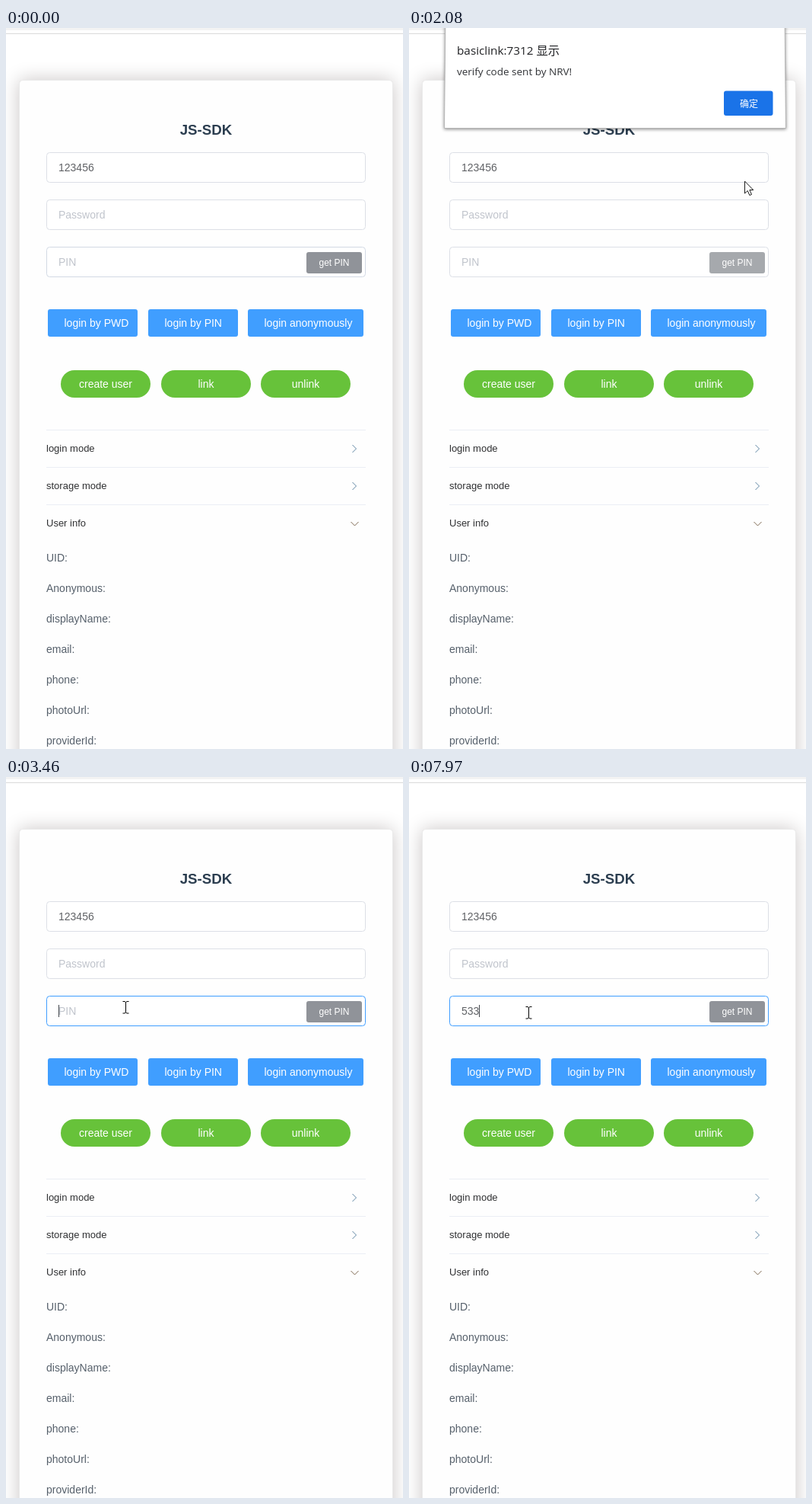
An HTML page that plays this animation: 522 by 946 pixels, repeating every 8000 ms.

```html
<!DOCTYPE html>
<html>
<head>
<meta charset="utf-8">
<style>
html, body { margin: 0; width: 100%; height: 100%; overflow: hidden; background: #fff; }
#stage { position: relative; width: 100%; height: 100%; overflow: hidden; contain: strict; }
#card { position: absolute; left: 17px; top: 68px; width: 490px; height: 1000px; border: 1px solid #eaeaea;
  border-radius: 5px; background: #fefefe; box-shadow: 0 0 25px #cac6c6; }
svg { position: absolute; left: 0; top: 0; }
text { font-family: "Liberation Sans", Arial, sans-serif; font-size: 14px; white-space: pre; }
#dialog text { font-family: "Open Sans", "Noto Sans CJK SC", "Noto Sans CJK", sans-serif; }
</style>
</head>
<body>
<div id="stage">
<div id="card"></div>
<svg width="522" height="946" viewBox="0 0 522 946">
  <rect width="522" height="3" fill="#f3f3f3"/>
  <rect y="7" width="522" height="1" fill="#dadada"/>
  <g id="page"></g>
  <rect id="caret" y="299" width="1" height="16" fill="#42464c"/>
  <g id="dialog">
    <path d="M48-20H494L495.5 131.5H46.5Z" fill="#fff" stroke="#b4b4b4" style="filter:drop-shadow(0 1px 2px #0007)"/>
    <text x="63" y="35" fill="#202124" style="font-size:15.3px">basiclink:7312 显示</text>
    <text x="63" y="62" fill="#303236" style="font-size:13.5px">verify code sent by NRV!</text>
    <rect x="414" y="82.5" width="64.5" height="32.5" rx="3" fill="#1a73e8"/>
    <text x="447" y="104" fill="#fff" text-anchor="middle" style="font-size:12px;font-weight:500">确定</text>
  </g>
  <path id="cursor" stroke-linejoin="round"/>
</svg>
</div>
<script>
const $ = id => document.getElementById(id);
const rect = (x, y, w, h, r, attrs) =>
  `<rect x="${x}" y="${y}" width="${w}" height="${h}" rx="${r}" ${attrs}/>`;
const text = (x, y, s, fill, attrs = '') => `<text x="${x}" y="${y}" fill="${fill}" ${attrs}>${s}</text>`;
const middle = 'text-anchor="middle"';

let page = text(263, 140, 'JS-SDK', '#2c3e50', middle + ' style="font-size:18.72px;font-weight:700"');
['123456', 'Password', 'PIN'].forEach((s, i) => {
  const y = 163 + 62 * i;
  page += rect(53.5, y + .5, 419, 39, 4, `id="box${i}" fill="#fff" stroke="#dcdfe6"`);
  page += text(69, y + 25, s, i ? '#c0c4cc' : '#606266', `id="value${i}"`);
});
page += rect(395, 294, 73, 28, 3, 'id="getPin"');
page += text(431.5, 312, 'get PIN', '#fff', middle + ' style="font-size:12px"');
[[55, 118, 'login by PWD'], [187, 118, 'login by PIN'], [318, 152, 'login anonymously']].forEach(([x, w, s]) => {
  page += rect(x, 369, w, 36, 3, 'fill="#409eff"') + text(x + 21.5, 392, s, '#fff');
});
['create user', 'link', 'unlink'].forEach((s, i) => {
  const x = Math.round(72 + 131.5 * i);
  page += rect(x, 449, 118, 36, 18, 'fill="#67c23a"') + text(x + 59, 472, s, '#fff', middle);
});
['login mode', 'storage mode', 'User info'].forEach((s, i) => {
  const y = 527 + 49 * i;
  page += rect(53, y, 420, 1, 0, 'fill="#ebeef5"') + text(53, y + 29, s, '#303133', 'style="font-size:13px"');
  page += i < 2
    ? `<path d="M455.5 ${y + 20}l5 5l-5 5" fill="none" stroke="#5f86a3"/>`
    : '<path d="M453.5 648l5 5l5-5" fill="none" stroke="#7d6750"/>';
});
['UID', 'Anonymous', 'displayName', 'email', 'phone', 'photoUrl', 'providerId'].forEach((s, i) => {
  page += text(53, 700 + 40 * i, s + ':', '#56606b');
});
$('page').innerHTML = page;

const shapes = {
  arrow: 'M0 0V16L3.8 12.5L6.4 18.5L9 17.4L6.4 11.5H11.3Z',
  hand: 'M-2 1.5Q0-1 2 1.5V8Q4 6.8 5.2 8.5Q7.2 7.6 8 9.8Q10 9.2 10.3 11.5V17L8.5 20.5V23.5H-1V21L-6 15Q-7.5 12-5.5 11Q-4 11-2 13.5Z',
  beam: 'M-3.5-7.5H-1L.5-6.5L2-7.5H4.5M.5-6.5V7M-3.5 8H-1L.5 7L2 8H4.5'
};
// Keys: time, x, y
const path = [[220, 345, 940], [600, 440, 420], [990, 455, 282], [1139, 455, 282], [1140, 446.5, 295],
  [1448, 434.5, 311.5], [1750, 434.5, 311.5], [2380, 448, 97], [2537, 446, 98], [2690, 413.5, 119.5],
  [3300, 165, 300], [3455, 157, 302], [5869, 157, 302], [6020, 157, 305], [6419, 157, 305], [6490, 157, 309]];
const fade = [[1689, 0], [1690, .45], [1770, .9], [1850, 1], [2610, 1], [2690, .85], [2770, .4], [2850, 0]];
const blinks = [[3455, 3780], [4310, 4860], [5410, 5940], [6490, 6970], [7270, 8000]];
const typed = [7270, 7820, 7970];

function at(keys, t) {
  const i = keys.findIndex(k => k[0] > t);
  if (i < 0) return keys[keys.length - 1].slice(1);
  if (!i) return keys[0].slice(1);
  const a = keys[i - 1], b = keys[i], p = (t - a[0]) / (b[0] - a[0]);
  return a.slice(1).map((v, j) => v + (b[j + 1] - v) * p);
}

// The screen refreshes in coarse steps while the pointer travels.
function stepped(t) {
  if (t < 220 || t > 3500) return t;
  const base = t < 1140 ? 220 : t < 1690 ? 1140 : 1690;
  return base + Math.floor((t - base + 2) / 76.9) * 76.9;
}

function draw(t) {
  const q = stepped(t), [x, y] = at(path, q), [p] = at(fade, q);
  const kind = q < 1140 ? 'arrow' : q < 1800 ? 'hand' : q < 3000 || y < 287 ? 'arrow' : 'beam';
  const cursor = $('cursor');
  cursor.setAttribute('d', shapes[kind]);
  cursor.setAttribute('transform', `translate(${x} ${kind == 'beam' ? Math.round(y) : y})`);
  cursor.setAttribute('fill', kind == 'beam' ? 'none' : '#fff');
  cursor.setAttribute('stroke', kind == 'beam' ? '#000' : '#181818');
  cursor.style.display = t < 220 ? 'none' : '';

  $('dialog').setAttribute('opacity', p);
  $('dialog').setAttribute('transform',
    `translate(271 ${-17 * (1 - p)}) scale(${1 + .016 * (1 - p)} 1) translate(-271 0)`);

  const hover = !p && x > 53 && x < 473 && y > 287 && y < 327;
  $('box2').setAttribute('stroke', t < 220 ? '#d2d9e4' : q >= 3455 ? '#409eff' : hover ? '#c0c4cc' : '#dcdfe6');
  $('getPin').setAttribute('fill', q > 1200 && q < 2900 ? '#a6a9ad' : '#909399');

  const n = typed.filter(k => t >= k).length;
  $('value2').textContent = n ? '533'.slice(0, n) : 'PIN';
  $('value2').setAttribute('fill', n ? '#606266' : '#c0c4cc');
  $('caret').setAttribute('x', Math.floor(69 + 7.79 * n));
  $('caret').style.display = blinks.some(([a, b]) => t >= a && t < b) ? '' : 'none';
}

const start = performance.now();
function frame() {
  draw((performance.now() - start) % 8000);
  requestAnimationFrame(frame);
}
frame();
</script>
</body>
</html>
```
